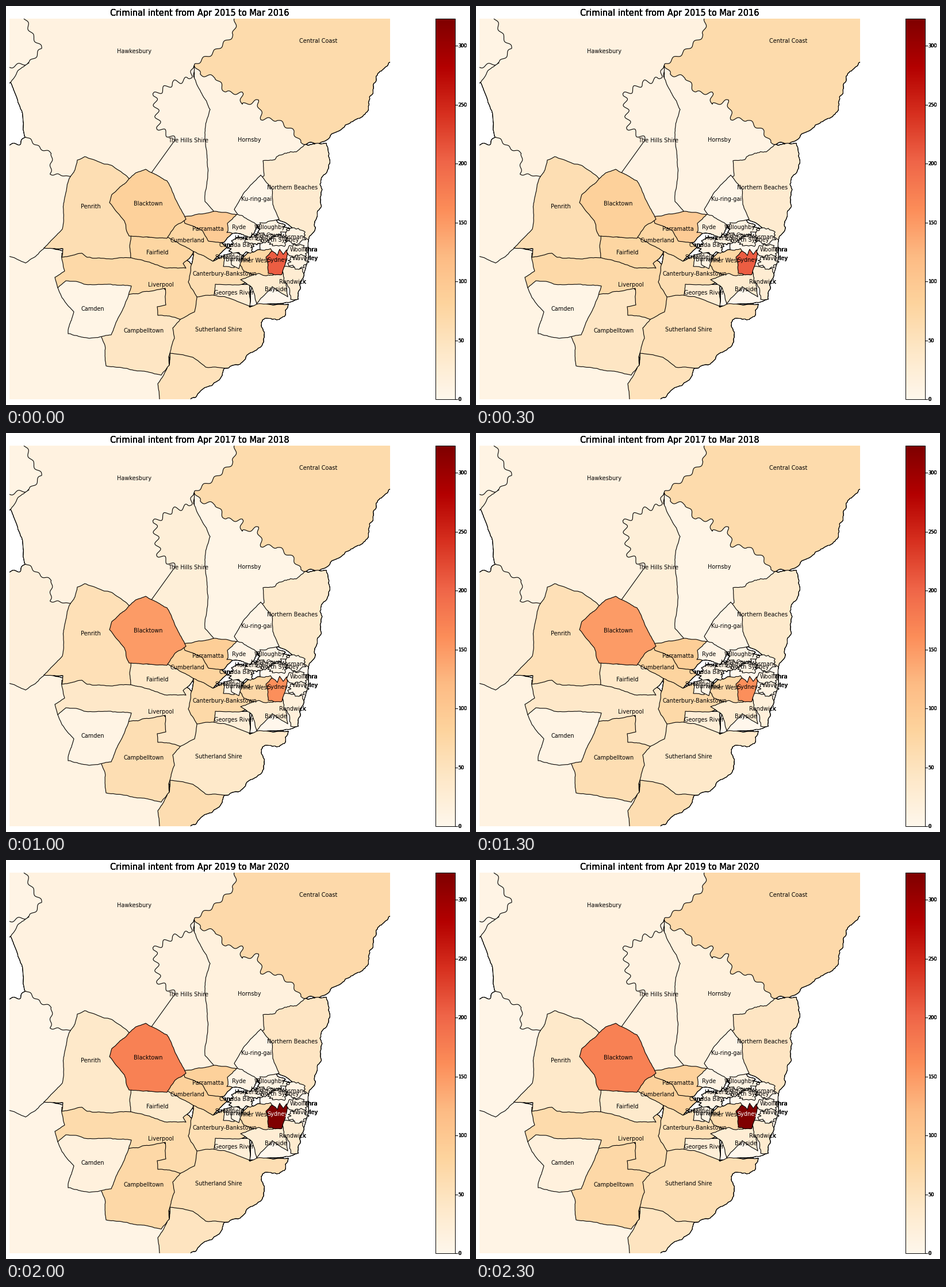
A matplotlib script for the animation above (2.5 s loop, 807x694 px).

```python
import numpy as np
import matplotlib.pyplot as plt
from matplotlib.animation import FuncAnimation
from matplotlib.patches import Polygon, Rectangle

W, H, DPI = 807, 694, 100
VMAX = 323
CMAP = plt.get_cmap("OrRd")
rng = np.random.default_rng(4)

fig = plt.figure(figsize=(W / DPI, H / DPI), dpi=DPI, facecolor="white")
ax = fig.add_axes([0, 0, 1, 1])
ax.axis("off")
frame = Rectangle((5.5, 21.5), 662.5, 662.5, transform=ax.transData)
patches, labels = [], {}


def split(a, b, amp):
    """Midpoint displacement between two points, without the last one."""
    d = b - a
    size = np.hypot(*d)
    if size < 4:
        return [a]
    mid = (a + b) / 2 + np.array([-d[1], d[0]]) * np.clip(rng.normal(0, amp), -0.15, 0.15)
    return split(a, mid, amp) + split(mid, b, amp)


def line(*v, amp=0.03):
    """Border through key points with a little natural roughness."""
    p = np.array(v, float).reshape(-1, 2)
    return np.array([q for a, b in zip(p, p[1:]) for q in split(a, b, amp)] + [p[-1]])


def coast(*v):
    return line(*v, amp=0.1)


def land(*v, amp=0.03):
    return line(*v, *v[:2], amp=amp)


def river(*v, amp=2.8, wave=23):
    """Border that meanders around the line through its key points."""
    p = np.array(v, float).reshape(-1, 2)
    s = np.r_[0, np.cumsum(np.hypot(*np.diff(p, axis=0).T))]
    t = np.arange(0, s[-1], 1.5)
    mid = np.column_stack([np.interp(t, s, p[:, k]) for k in (0, 1)])
    d = np.gradient(mid, axis=0)
    normal = np.column_stack([-d[:, 1], d[:, 0]]) / np.hypot(*d.T)[:, None]
    swing = amp * np.sin(2 * np.pi * t / wave) * np.minimum(1, (s[-1] - t) / wave)
    return np.vstack([mid + normal * swing[:, None], p[-1:]])


def cove(x, y, rx, ry, n=34):
    """Headland with many small inlets."""
    a = np.linspace(0, 2 * np.pi, n, endpoint=False)
    r = 1.05 - 0.4 * rng.random(n)
    return np.column_stack([x + rx * r * np.cos(a), y + ry * r * np.sin(a)])


def write(s, x, y, px, z=5, copies=1, **kw):
    """Text on a baseline; repeated copies thicken its soft edges."""
    return [ax.text(x, y, s, fontsize=px * 72 / DPI, family="DejaVu Sans", va="baseline",
                    zorder=z, **kw) for _ in range(copies)]


def area(name, x, y, values, *parts):
    """Add a region on top of the earlier ones, hiding their edges below it."""
    outline = np.vstack(parts)
    for z, fill, copies in ((0, False, 3), (2, True, 1)):
        for _ in range(copies):
            patch = Polygon(outline, fill=fill, ec="black", lw=0.8, joinstyle="round", zorder=z)
            ax.add_patch(patch).set_clip_path(frame)
    patches.append((patch, values))
    write(name, x, y + 3.5, 9.8, z=1, copies=4, ha="center")
    labels[name] = write(name, x, y + 3.5, 9.8, ha="center")[0]


# Harbour and bay, then the outer regions
mountains, west, quiet = (9, 20, 21, 8, 6), (9, 8, 9, 9, 8), (12, 9, 9, 9, 11)
area("", 0, 0, [0] * 5, land(440, 380, 525, 395, 526, 440, 502, 512, 424, 522, 430, 480))
area("", 0, 0, (10, 5, 12, 10, 8), land(-20, 400, 200, 450, 300, 650, 300, 720, -20, 720))
area("Hawkesbury", 223, 78, (15, 13, 14, 13, 14),
     land(-20, -20, 430, -20, 430, 50, 340, 110, 320, 200, 250, 330, 150, 310, 60, 320))
area("", 0, 0, mountains,
     river(-20, 242, 24, 240, 34, 226, 60, 248, 80, 256, 77, 292, 109, 296, amp=1.8, wave=19),
     line(140, 300, 140, 420, 66, 421, 34, 447, -20, 428))
area("", 0, 0, mountains, land(-20, 150, 6, 134, 21, 112, 40, 99, -20, 95))
area("", 0, 0, west, [(-20, -10)],
     river(33, -10, 33, 22, 46, 52, 62, 74, 42, 98, 6, 106, -20, 108))
area("Hornsby", 423, 232, (11, 15, 7, 12, 17),
     land(327, 104, 420, 110, 545, 215, 520, 243, 490, 300, 410, 370, 350, 370, 330, 150))
area("The Hills Shire", 317.5, 233.5, (11, 23, 23, 10, 14),
     [(310, 380), (270, 330), (253, 290)],
     river(294, 233, 266, 212, 258, 155, 290, 134, 318, 127, 327, 104, amp=4.5, wave=20),
     line(327, 104, 326, 122, 355, 180, 346, 230, 351, 290, 346, 340, 361, 357, 345, 370))
area("Central Coast", 543, 60, (68, 70, 68, 68, 70), [(402, -20)],
     river(400, 18, 396, 50, 362, 80, 329, 101, 337, 119, 365, 124, 382, 150, 410, 152,
           410, 172, 438, 165, 445, 196, 472, 198, 500, 218, 512, 238, 545, 239),
     coast(545, 239, 590, 207, 628, 184, 632, 158, 678, 88), [(700, -20)])
area("Northern Beaches", 498.5, 315, (32, 25, 36, 44, 46),
     coast(447, 269, 485, 256, 520, 241, 557, 239, 563, 268, 546, 310, 538, 385, 526, 407),
     line(500, 387, 470, 370, 442, 300, 449, 295, 447, 269))
area("Ku-ring-gai", 436, 335, (4, 6, 8, 4, 6),
     land(443, 294, 463, 319, 464, 345, 475, 371, 436, 382, 405, 370, 397, 354, 411, 330))

# South and west
area("Sutherland Shire", 369.5, 562.5, (58, 38, 38, 53, 61),
     line(380, 630, 365, 650, 300, 625, 270, 600, 285, 540, 345, 495, 410, 505, 424, 524,
          438, 518, 491, 519),
     coast(491, 519, 484, 540, 446, 546, 448, 583, 425, 603, 380, 630))
area("Campbelltown", 240, 564, (45, 68, 61, 73, 73),
     land(163, 570, 172, 590, 174, 626, 270, 642, 284, 625, 283, 610, 293, 578, 290, 560,
          303, 545, 300, 510, 260, 480, 200, 490, 180, 540))
area("", 0, 0, (53, 75, 62, 52, 48),
     line(262, 720, 267, 684, 264, 657, 284, 625, 285, 604, 325, 611, 347, 628, 380, 630),
     coast(380, 630, 345, 664, 321, 684, 310, 700))
area("Liverpool", 269, 484, (71, 39, 40, 61, 68),
     land(97, 430, 102, 461, 85, 472, 90, 490, 200, 515, 213, 502, 277, 491, 278, 520,
          263, 523, 264, 538, 303, 545, 328, 532, 332, 507, 335, 460, 300, 430, 150, 420))
area("Camden", 151, 526, (7, 12, 10, 22, 17),
     land(104, 478, 218, 487, 208, 515, 183, 572, 145, 578, 108, 570, 118, 532, 90, 490))
area("Penrith", 147.5, 348, (61, 65, 58, 45, 38),
     land(137, 262, 183, 277, 215, 301, 235, 330, 235, 425, 216, 438, 141, 437, 132, 430,
          97, 437, 99, 422, 66, 421, 98, 388, 110, 300, 120, 285, 124, 268))
area("Cumberland", 315, 407.5, (75, 85, 80, 63, 87),
     land(290, 370, 310, 370, 368, 405, 384, 420, 360, 444, 290, 425, 270, 395))
area("Parramatta", 351, 387, (95, 72, 91, 86, 86),
     land(309, 366, 362, 357, 402, 363, 412, 380, 385, 403, 379, 411, 352, 409, 342, 391,
          311, 378))
area("Fairfield", 263.5, 428, (78, 40, 41, 40, 36),
     land(218, 395, 281, 402, 326, 427, 308, 448, 313, 456, 280, 456, 217, 438))
area("Blacktown", 247, 343, (85, 109, 150, 160, 173),
     land(243, 284, 280, 304, 297, 340, 313, 371, 294, 383, 280, 404, 214, 400, 206, 374,
          180, 342, 184, 328, 212, 303, 226, 290))

# Inner suburbs
area("Canterbury-Bankstown", 380, 465, (62, 72, 71, 50, 60),
     land(326, 427, 360, 444, 378, 436, 425, 455, 434, 471, 362, 503, 332, 506, 317, 480))
area("Georges River", 396, 498, (30, 30, 25, 20, 25),
     land(364, 484, 424, 484, 424, 522, 362, 503))
area("Bayside", 469, 492, (33, 25, 32, 24, 27),
     land(408, 476, 440, 463, 485, 465, 490, 506, 463, 488, 436, 518, 428, 490))
area("Inner West", 431, 442, (75, 75, 73, 48, 66),
     land(404, 448, 420, 430, 460, 422, 465, 468, 430, 467, amp=0.08))
area("Ryde", 405.5, 384, (18, 12, 8, 10, 11),
     land(402, 362, 437, 381, 424, 404, 384, 394, 385, 378, amp=0.06))
area("Strathfield", 389, 436, quiet, land(379, 433, 396, 430, 397, 455, 378, 453))
area("Burwood", 403, 440, quiet, land(392, 428, 411, 433, 405, 457, 392, 450))
area("Canada Bay", 400, 415, quiet, cove(410, 418, 25, 15))
area("Hunters Hill", 427, 403, quiet, cove(432, 407, 17, 9))
area("Lane Cove", 452, 398, quiet, cove(450, 400, 17, 12))
area("Willoughby", 459, 384, quiet, cove(462, 386, 29, 14))
area("North Sydney", 476.5, 406, quiet, cove(473, 409, 18, 11))
area("Mosman", 497, 401.5, quiet, cove(503, 401, 20, 15))
area("Randwick", 498, 479, (30, 26, 20, 23, 34),
     coast(478, 453, 516, 457, 512, 490, 508, 510, 495, 510, 483, 480, 478, 453))
area("Woollahra", 517.5, 423.5, quiet, cove(506, 427, 21, 13))
area("Waverley", 520, 438.5, quiet, cove(508, 445, 18, 13))
area("Sydney", 472.5, 441.5, (208, 206, 160, 204, 323),
     land(452, 437, 463, 426, 472, 434, 476, 423, 482, 432, 488, 424, 488, 440, 480, 467,
          456, 465, amp=0.05))

# Colour bar
ax.imshow(np.linspace(1, 0, 256)[:, None], cmap=CMAP, extent=(747, 781, 684, 22),
          aspect="auto", interpolation="nearest", zorder=2)
ax.add_patch(Rectangle((747, 22), 34, 662, fill=False, ec="black", lw=0.7, zorder=3))
for v in range(0, 301, 50):
    y = 684 - 662 * v / VMAX
    ax.plot([781, 784.5], [y, y], color="black", lw=0.8, zorder=3)
    write(str(v), 786.5, y + 3.2, 8.17, copies=5)

titles = write("", 336.8, 17, 14.55, copies=4, ha="center")
ax.set_xlim(0, W)
ax.set_ylim(H, 0)


def update(i):
    for patch, values in patches:
        patch.set_facecolor(CMAP(values[i] / VMAX))
    # Dark fills carry a white label.
    labels["Sydney"].set_color("white" if patches[-1][1][i] > 300 else "black")
    for t in titles:
        t.set_text(f"Criminal intent from Apr {2015 + i} to Mar {2016 + i}")
    return titles


anim = FuncAnimation(fig, update, frames=5, interval=500, repeat=True, repeat_delay=0)
plt.show()
```
